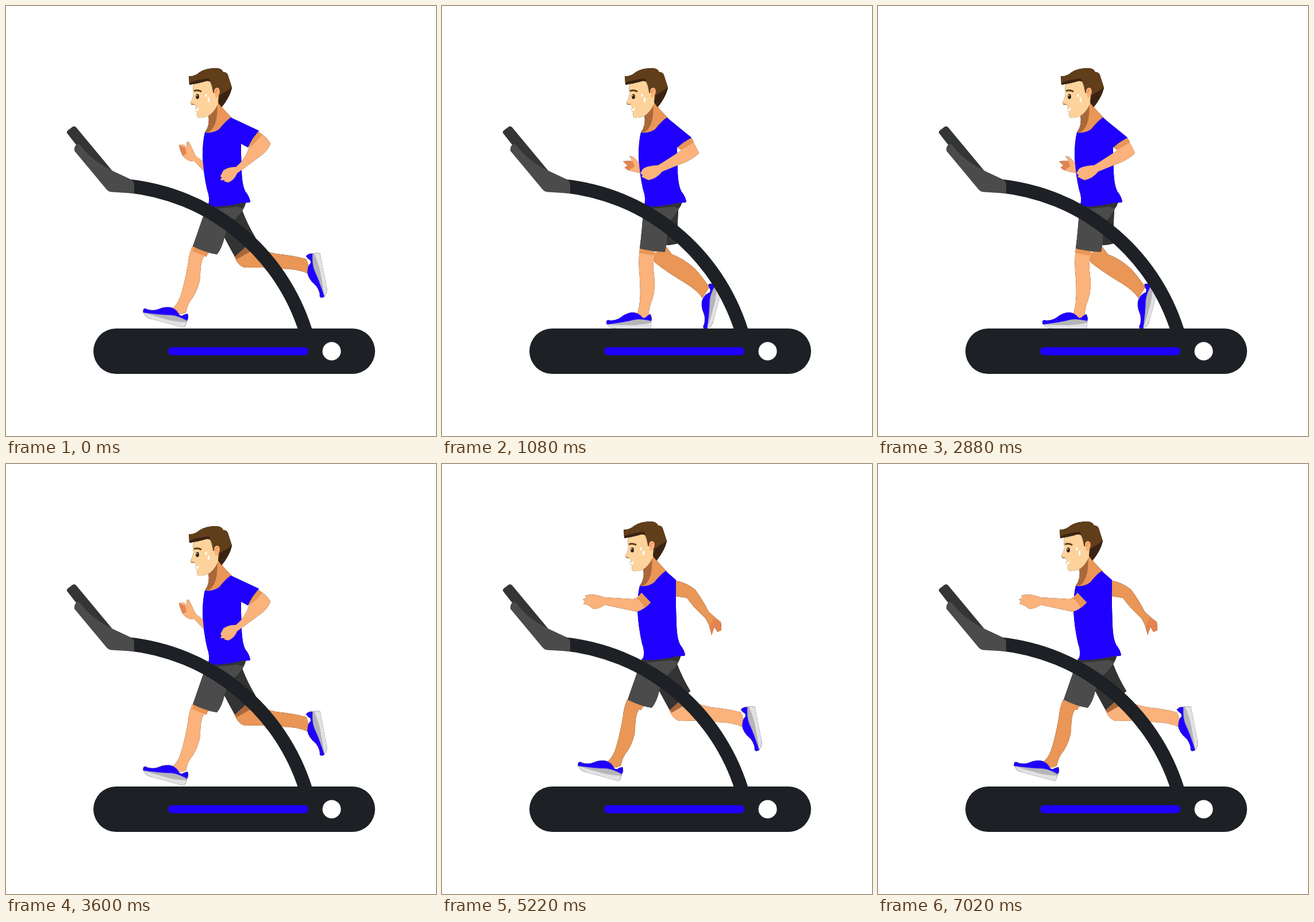
Recreate the animation shown at these times as an HTML page. Size 748x748 px, loop 7170 ms.

```html
<!DOCTYPE html>
<html lang="en">
<head>
<meta charset="utf-8">
<title>Treadmill runner</title>
<style>
  html, body { margin: 0; width: 100%; height: 100%; overflow: hidden; background: #fff; }
  svg { display: block; width: 100%; height: 100%; }
  .figure { filter: drop-shadow(0 0 .5px #000); }
</style>
</head>
<body>
<svg viewBox="0 0 748 748">
  <g class="figure" id="runner"></g>
  <g id="treadmill">
    <path d="M212 313A363 363 0 0 1 521 565" fill="none" stroke="#1d2125" stroke-width="23.5"/>
    <path d="M106 221Q105 218 108 216L116 210Q119 208 122 211L186 288L150 284L124 244Z" fill="#333635"/>
    <path d="M119 252Q118 244 123 241Q127 239 130 243Q150 270 186 287L218 302Q223 305 223 312V326L183 323.500Q178 323 174 318Z" fill="#4b4b4b"/>
    <rect x="152" y="561" width="490" height="79" rx="39.5" fill="#1d2125"/>
    <rect x="282" y="593.5" width="244" height="14" rx="7" fill="#1f00ff"/>
    <circle cx="566.5" cy="600.5" r="16" fill="#fff"/>
  </g>
</svg>
<script>
const BLUE = '#1f00ff', LIGHT = '#fbb27b', TAN = '#e99656', BROWN = '#a9683b';
const GREY = '#4b4b4b', DARK = '#333';
const STEP = 180, LOOP = 7170;

const shape = (d, fill) => `<path d="${d}" fill="${fill}"/>`;
const line = (d, color, width) =>
  `<path d="${d}" fill="none" stroke="${color}" stroke-width="${width}"/>`;

const shoe = ([x, y, angle]) => `<g transform="translate(${x} ${y}) rotate(${angle})">` +
  shape('M-63 11L-14 4L14 5Q15 14 12 20H-46Q-60 20 -63 11Z', '#e2e2e4') +
  shape('M-63 12L-14 3L14 5V10Q-8 15 -28 14Q-48 14 -63 13Z', '#b5b5b7') +
  shape('M-64 10Q-65 4 -57 6Q-46 6 -38 0Q-28 -8 -17 -8Q-7 -7 -1 1Q3 3 7 -2L12 -5Q16 1 14 7Q-2 3 -14 4.500Q-36 10 -63 13Z', BLUE) +
  '</g>';

const leg = ({ calf, hem, foot, shorts }, skin, shade, cloth) =>
  shape(calf, skin) + line(hem, shade, 13) + shoe(foot) + shape(shorts, cloth);

const strideFront = {
  calf: 'M324 418Q318 432 317 446Q311 482 303 506Q298 519 290 526Q295 537 305 536L313 533Q316 517 325 507Q336 490 338 470Q338 446 344 436L353 430Z',
  hem: 'M326 420L351 430', foot: [303, 537, 15],
  shorts: 'M350 346L417 342Q414 356 402 367Q386 382 380 402Q376 421 367 432Q346 429 325 418Z'
};
const strideBack = {
  calf: 'M397 435Q405 455 418 455Q450 454 480 457Q506 457 524 465Q529 452 522 440Q500 434 470 431Q444 425 424 419Z',
  hem: 'M398 435L424 420', foot: [529, 446, -101],
  shorts: 'M375 365L411 356Q420 380 434 403Q416 420 398 436Q388 418 378 399Z'
};

const poses = [
  {
    x: 0, y: 0,
    back: strideBack, front: strideFront, leading: 'near',
    farArm: 'M301 241L309 241L315 247L314 237L318 236Q325 250 330 261Q338 267 344 272V287Q335 278 328 270Q315 271 307 260Q304 252 301 241Z',
    fingers: 'M301 242L312 247L314 258L307 260L303 250Z',
    sleeve: 'M391 194L440 217Q428 230 421 246L406 238Z',
    arm: 'M429 231L440 220Q453 227 460 239Q457 250 444 260L402 291Q398 302 387 307L379 305L381 303L373 303L375 298L373 296L378 286Q388 279 400 280Q416 267 423 246Z',
    cuff: 'M439 219L446 224Q437 235 427 243L421 246Q427 232 439 219Z'
  },
  {
    x: 0, y: 0,
    back: {
      calf: 'M366 432Q368 442 370 446Q390 462 420 480Q444 494 453 508L465 489Q452 470 440 457Q420 439 400 432L391 420Z',
      hem: '', foot: [465, 497, -75],
      shorts: 'M378 365L411 354Q409 385 410 413Q400 416 388 416Z'
    },
    front: {
      calf: 'M344 421Q341 445 344 473Q346 505 343 522Q341 534 337 540Q346 545 359 545Q359 526 366 510Q372 490 369 470Q366 450 370 427Z',
      hem: 'M345 423L369 428', foot: [350, 541, 0],
      shorts: 'M351 346L417 342Q412 356 399 372Q390 392 391 412L388 428Q365 427 344 422Q348 390 351 346Z'
    },
    leading: 'near',
    farArm: 'M315 270L331 269L326 261L332 262Q341 270 347 279V291Q332 288 325 286L318 281L323 278Z',
    fingers: 'M315 270L331 270L335 279L324 286L318 281L323 277Z',
    sleeve: 'M391 194L434 229Q419 237 411 247L405 240Z',
    arm: 'M420 240L433 231Q442 244 447 256Q439 264 425 271L383 288Q374 300 359 303L347 297L349 294L345 291L349 284Q355 278 376 277Q400 262 418 250Z',
    cuff: 'M434 230L438 237Q425 246 415 250L410 246Q421 235 434 230Z'
  },
  {
    x: -1, y: -4,
    back: {
      calf: 'M340 408Q336 430 350 437Q388 455 424 487L440 470Q413 441 387 426L378 412Z',
      hem: '', foot: [440, 482, -65],
      shorts: 'M351 346L405 344Q390 380 380 416Q358 415 338 407Q348 380 351 346Z'
    },
    front: {
      calf: 'M373 422Q376 452 390 483Q399 508 400 538Q410 544 420 539Q425 505 424 480Q418 452 415 419Z',
      hem: 'M375 424L413 420', foot: [410, 544, -7],
      shorts: 'M351 346L417 342Q421 370 418 420Q395 426 371 424Q360 390 351 346Z'
    },
    leading: 'near',
    farArm: 'M405 225Q428 245 424 265Q418 285 400 290Z',
    fingers: '',
    sleeve: 'M391 194Q412 215 421 238L392 250L375 220Z',
    arm: 'M395 249L421 238Q426 262 415 275Q405 283 380 287L342 294Q326 303 315 295L317 291L312 288Q315 279 342 279Q370 272 392 262Z',
    cuff: 'M395 249L421 238L423 247L394 257Z'
  },
  {
    x: -2, y: -8,
    back: {
      calf: 'M396 427Q400 445 425 462Q450 480 463 507L479 496Q474 465 456 445Q440 425 430 404Z',
      hem: 'M397 428L430 407', foot: [474, 504, -62],
      shorts: 'M375 365L415 350Q422 382 433 404Q416 420 396 429Q385 410 375 390Z'
    },
    front: {
      calf: 'M309 398Q303 420 308 440Q314 480 309 506Q318 513 330 509Q336 470 336 445Q342 425 347 418Z',
      hem: 'M310 400L345 419', foot: [320, 509, 5],
      shorts: 'M350 346L417 342Q408 365 388 378Q364 394 348 422Q326 414 308 398Q329 373 350 346Z'
    },
    leading: 'far',
    farArm: 'M405 215Q432 230 442 255Q445 285 440 300Q428 305 424 290Q422 262 405 250Z',
    fingers: '',
    sleeve: '',
    arm: 'M363 235L388 248Q385 268 370 272Q350 276 318 269Q302 278 284 269L278 263Q281 254 300 251L318 255Q340 258 352 255Z',
    cuff: 'M363 235L388 248L384 257L358 245Z'
  },
  {
    x: -2, y: -8,
    back: strideBack, front: strideFront, leading: 'far',
    farArm: 'M409 211Q424 213 442 226Q456 245 466 265Q478 276 487 283L488 297L481 300L476 291L471 305L468 294Q465 283 459 275Q440 258 428 241L409 238Z',
    fingers: 'M474 276L487 283L488 297L481 300L476 291L471 305L468 292Z',
    sleeve: '',
    arm: 'M349 232L365 249Q354 261 341 265L285 253Q276 260 265 260L257 254L248 251L251 246L247 244L254 240L251 237Q258 234 272 236L285 240L334 243Q342 242 349 232Z',
    cuff: 'M349 232L365 249Q360 254 354 258Q350 248 341 242Q346 239 349 232Z'
  }
];

const neck =
  shape('M367 165L379 180L394 196L374 218Q360 224 346 220Q355 208 352 188Z', TAN) +
  shape('M368 168L367 190Q365 210 354 219L346 220Q356 206 352 190Z', BROWN);

const waist = shape('M351 347L417 342Q416 349 411 352L402 349L353 354Z', DARK);

const shirt = shape('M346 220Q360 222 371 214Q382 200 391 194L409 210Q408 250 410 290Q411 312 416 322Q424 332 425 341Q418 343 412 342Q382 350 351 349Q356 336 350 320Q344 295 342 263Q342 235 346 220Z', BLUE);

const head =
  shape('M325 137Q342 133 354 128L360 148L371 149L369 170Q361 187 350 192Q341 195 334 194Q331 189 333 186L329 180L331 176L328 171L320 169Q325 162 326 154Z', '#fdd39b') +
  shape('M318 122Q328 123 337 115Q348 108 365 108Q375 108 378 115Q384 115 386 120L393 142Q389 159 375 176L369 168L370 150L360 151Q360 140 354 129Q336 134 319 137Z', '#613e1a') +
  shape('M319 133Q338 127 353 126L356 132Q350 129 344 132Q330 135 319 137Z', '#3b2313') +
  shape('M393 142Q389 159 375 176L369 168L372 155Z', '#3b2313') +
  shape('M363 155Q360 143 367 142Q374 143 371 153Q368 161 364 159Z', LIGHT) +
  line('M365 152Q364 145 369 146', TAN, 2) +
  line('M327 148Q333 145 340 149', '#613e1a', 3) +
  '<ellipse cx="333" cy="157.5" rx="2.8" ry="4.3" fill="#2a1a12"/>' +
  '<circle cx="332.2" cy="156" r="1" fill="#fff"/>' +
  shape('M329 180L336 177Q335 182 332 183Z', '#fff') +
  line('M322 171L328 171', TAN, 1.2) +
  line('M348 153V158M352.500 159V167', '#fff', 3);

const drawPose = p => {
  const [frontSkin, backSkin] = p.leading === 'near' ? [LIGHT, TAN] : [TAN, LIGHT];
  return `<g transform="translate(${p.x} ${p.y})">` +
    shape(p.farArm, backSkin === TAN ? LIGHT : TAN) + shape(p.fingers, '#e58450') +
    leg(p.back, backSkin, BROWN, DARK) +
    leg(p.front, frontSkin, TAN, GREY) +
    waist + neck + shirt + shape(p.sleeve, BLUE) + head +
    shape(p.arm, LIGHT) + shape(p.cuff, TAN) + '</g>';
};

const runner = document.getElementById('runner');
runner.innerHTML = poses.map(drawPose).join('');
const views = [...runner.children];
const start = performance.now();

function render(now) {
  const t = Math.max(0, now - start) % LOOP;
  const current = Math.floor(t / STEP) % poses.length;
  views.forEach((view, i) => view.setAttribute('display', i === current ? 'inline' : 'none'));
}

function tick(now) {
  render(now);
  requestAnimationFrame(tick);
}
render(start);
requestAnimationFrame(tick);
</script>
</body>
</html>
```
